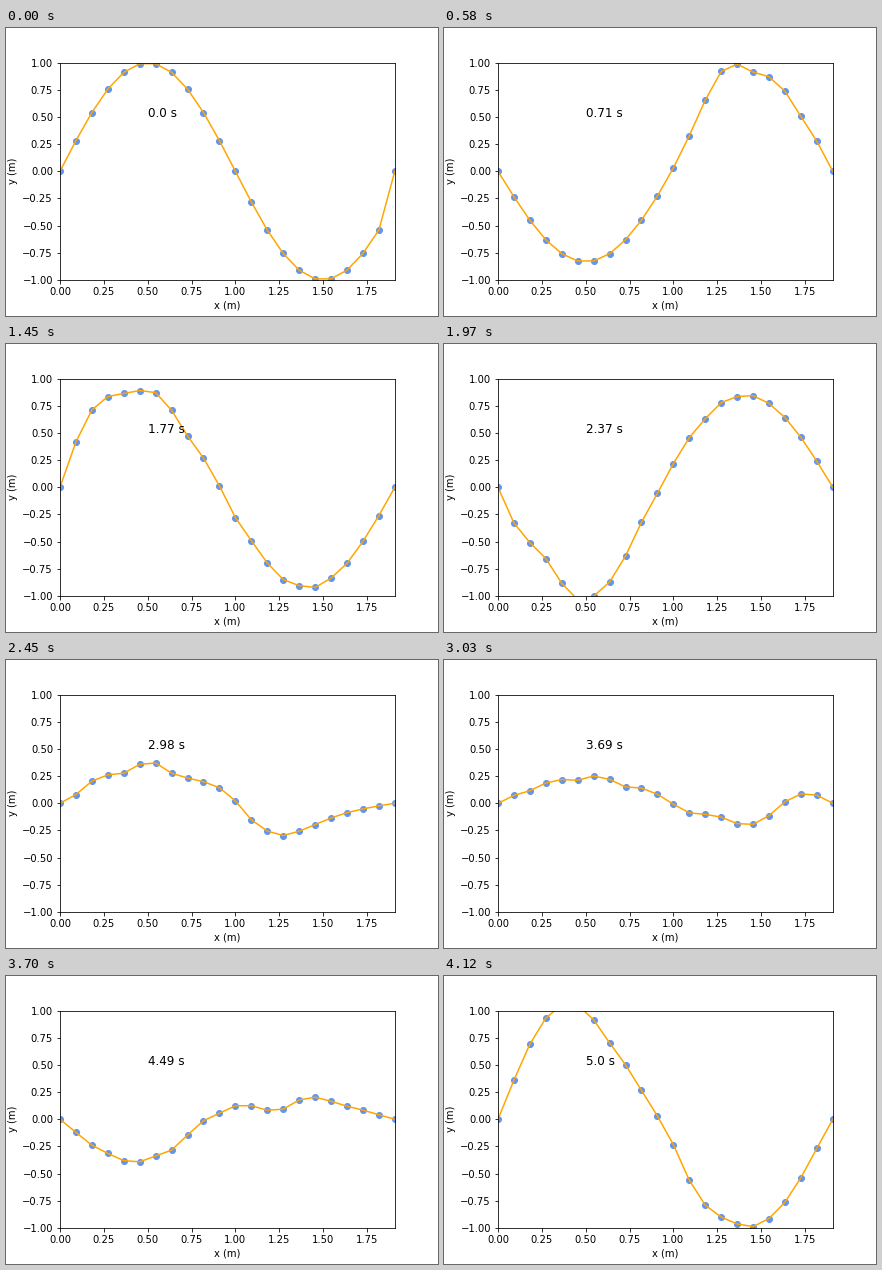
A matplotlib script that plays this animation: 432x288 px, repeating every 4.18 s.

```python
import numpy as np
import matplotlib.pyplot as plt
from matplotlib.animation import FuncAnimation

LOOP_MS, TICK_MS = 4180, 20
STEPS = 100              # simulated instants, at 24 per second
SLOTS = 138              # equal display slots in the loop, 33 per second
T_END = 5.0              # simulated seconds
N = 21                   # segments between the fixed ends
A = 1 / 11               # spacing of the beads (m)
W0 = np.sqrt(4 / 3) / A  # coupling rate of neighbouring beads (1/s)

plt.rcParams.update({"font.family": "DejaVu Sans", "font.size": 10})

# Beads on a string: release a sine at rest, ends held, solve by normal modes.
k = np.arange(N + 1)
x = k * A
y0 = np.sin(np.pi * x)
y0[[0, -1]] = 0
n = np.arange(1, N)
modes = np.sin(np.pi * np.outer(k, n) / N)
amps = 2 / N * modes.T @ y0
omega = 2 * W0 * np.sin(np.pi * n / (2 * N))
times = np.linspace(0, T_END, STEPS)


def shape(t):
    return modes @ (amps * np.cos(omega * t))


def step_at(ms):
    # 24 steps spread over 33 slots; slots begin on the nearest 10 ms.
    slot = int((ms + 5) * SLOTS / LOOP_MS)
    return min((8 * slot + 3) // 11, STEPS - 1)


fig = plt.figure(figsize=(6, 4), dpi=72, facecolor="white")
fig.subplots_adjust(left=0.125, right=0.9, bottom=0.125, top=0.88)
ax = fig.add_subplot()
ax.set(xlim=(0, x[-1]), ylim=(-1, 1), xlabel="x (m)", ylabel="y (m)")
ax.set_xticks(np.arange(0, 1.8, 0.25))
ax.set_yticks(np.linspace(-1, 1, 9))

beads, = ax.plot(x, y0, "o", color="cornflowerblue", ms=6)
string, = ax.plot(x, y0, color="orange", lw=1.5)
clock = ax.text(0.5, 0.5, "", fontsize=12)


def update(i):
    t = times[step_at((i + 0.5) * TICK_MS)]
    y = shape(t)
    beads.set_ydata(y)
    string.set_ydata(y)
    clock.set_text(f"{round(float(t), 2)} s")
    return beads, string, clock


anim = FuncAnimation(fig, update, frames=LOOP_MS // TICK_MS, interval=TICK_MS,
                     repeat=True, repeat_delay=0, blit=False)
plt.show()
```
